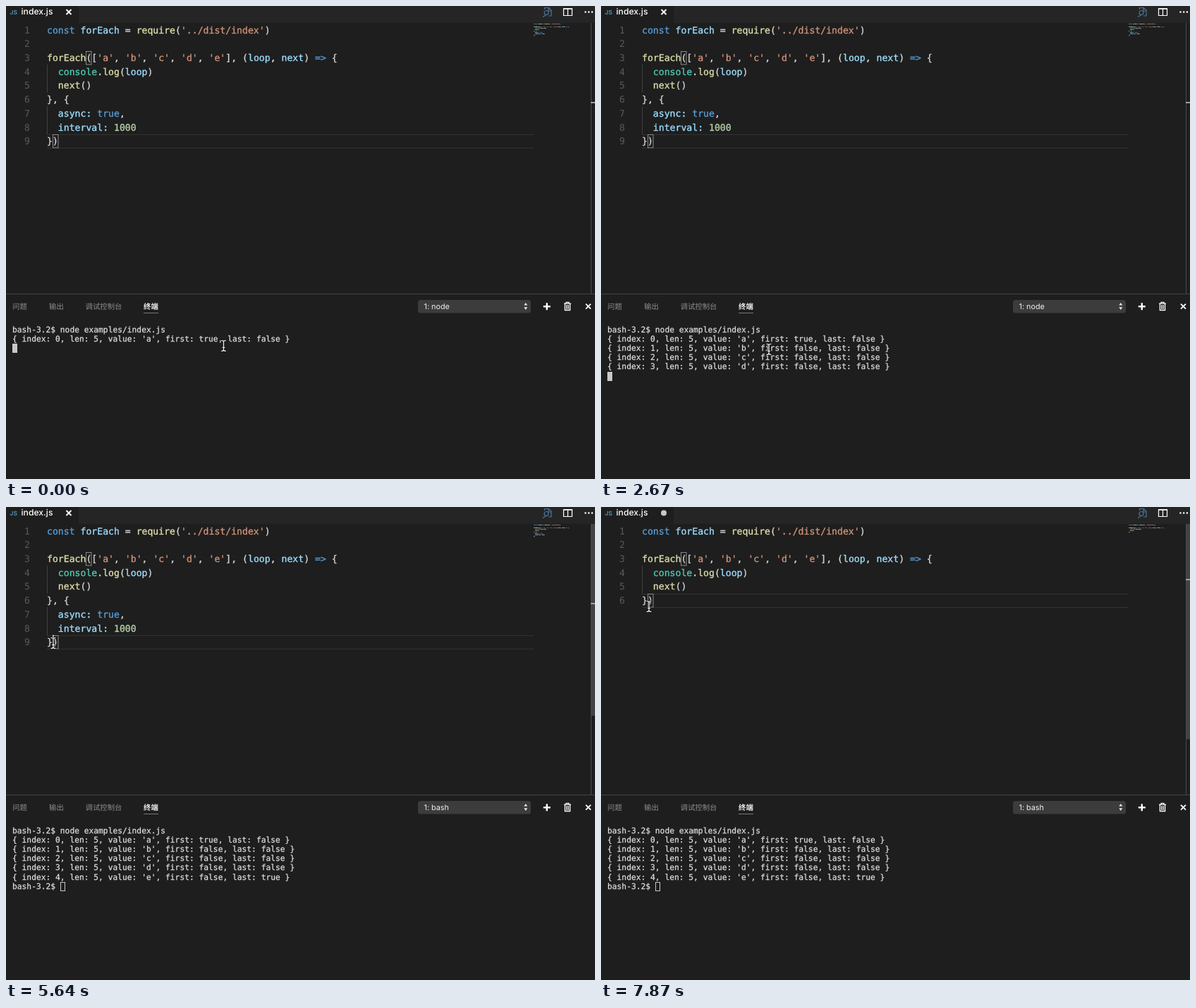
Animation of 835x671 px, one loop 8 s. Source, as an HTML page:

```html
<!DOCTYPE html>
<html lang="zh">
<head>
<meta charset="utf-8">
<style>
  html, body { margin: 0; width: 100%; height: 100%; overflow: hidden; background: #1e1e1e; }
  svg { display: block; }
  text { white-space: pre; text-rendering: geometricPrecision; }
  .code { font: 13.15px "DejaVu Sans Mono", monospace; fill: #d4d4d4; stroke-width: .35; }
  .code tspan { stroke: currentColor; fill: currentColor; }
  .num { fill: #5a5a5a; }
  .map { stroke-width: 1.6; }
  .term { font: 11.28px "DejaVu Sans Mono", monospace; fill: #dedede; stroke: #dedede; stroke-width: .25; }
  .ui { font-family: Inter, "Liberation Sans", sans-serif; fill: #fff; }
  .tab { font: 500 10.4px "Noto Sans CJK SC", "Noto Sans CJK", sans-serif; fill: #8e8e8e; }
  .line { fill: none; stroke: #fff; }
</style>
</head>
<body>
<svg width="835" height="671" viewBox="0 0 835 671">
  <rect width="835" height="671" fill="#1e1e1e"/>
  <rect x="103" width="732" height="24" fill="#252526"/>
  <text class="ui" x="5.5" y="11.5" font-size="8.5" font-weight="600" style="fill:#519aba">JS</text>
  <text class="ui" x="21.5" y="12.4" font-size="12.2" font-weight="500">index.js</text>
  <path id="close" class="line" stroke-width="1.9" d="M85.5 5l7 7m0-7l-7 7"/>
  <circle id="dirty" cx="89" cy="8.5" r="4" fill="#c8c8c8"/>
  <g class="line" stroke-width="1.2">
    <path d="M763.5 5V2.5h6l3.5 3.5v8h-4M769 3v4h4M766 12.5l-5 3" stroke="#4c7596"/>
    <circle cx="766" cy="9.5" r="3" stroke="#4c7596"/>
    <path d="M790.5 3.5h12v10h-12zM796.5 4v9.5M790 4.2h13"/>
  </g>
  <path d="M821.5 8.5h0m4.7 0h0m4.7 0h0" class="line" stroke-width="2.6" stroke-linecap="round"/>

  <g id="current" fill="none" stroke="#323232"><path d="M58 .5H748M58 19.5H748"/></g>
  <g id="selection" fill="#264f78"></g>
  <g id="long"></g>
  <g id="short"></g>
  <g id="brackets" fill="none" stroke="#8a8a8a">
    <rect x="113.5" y="64.5" width="7.5" height="18.5"/>
    <rect id="closing" x="66.5" y=".5" width="7.5" height="18.5"/>
  </g>
  <rect id="caret" x="66" width="1.8" height="19.5" fill="#c4c4c2"/>

  <rect id="slider" x="829" y="24" width="6" fill="#434343"/>
  <path d="M829.5 24V408" stroke="#4a4a4a"/>
  <rect id="mark" x="829" width="6" height="2" fill="#a0a0a0"/>

  <path d="M0 408.5H835" stroke="#454545"/>
  <g class="tab">
    <text x="9" y="429.8">问题</text>
    <text x="61" y="429.8">输出</text>
    <text x="112.5" y="429.8">调试控制台</text>
    <text x="195" y="429.8" font-weight="700" style="fill:#f0f0f0">终端</text>
  </g>
  <path d="M195 435.5h21" stroke="#777"/>
  <rect x="584" y="417" width="160" height="18.5" rx="3.5" fill="#3c3c3c"/>
  <text id="shell" class="ui" x="592.5" y="429.8" font-size="10.8" style="fill:#f0f0f0"></text>
  <path d="M734.3 424.5h5l-2.5-3.6zM734.3 427.3h5l-2.5 3.6z" fill="#e8e8e8"/>
  <path class="line" stroke-width="2.4" d="M761.8 426.2h10M766.8 421.2v10"/>
  <path class="line" stroke-width="1.3" d="M791 422.2h10M794 422v-1.6h4v1.6M792.4 422.5v9h7.2v-9M794.8 424v6M797.2 424v6"/>
  <path class="line" stroke-width="1.9" d="M822 422.7l7 7m0-7l-7 7"/>

  <g id="terminal" class="term"></g>
  <rect id="block"/>
  <g id="mouse">
    <g id="beam" fill="none" stroke-linecap="round">
      <path d="M-3-7.5Q0-7.5 0-5.5V5.5Q0 7.5-3 7.5M3-7.5Q0-7.5 0-5.5V5.5Q0 7.5 3 7.5M-1.5 2.5h3" stroke="#1a1a1a" stroke-width="2.6"/>
      <path d="M-3-7.5Q0-7.5 0-5.5V5.5Q0 7.5-3 7.5M3-7.5Q0-7.5 0-5.5V5.5Q0 7.5 3 7.5M-1.5 2.5h3" stroke="#f4f4f4" stroke-width="1.2"/>
    </g>
    <path id="arrow" d="M.5.8V13.5L3.3 10.8 5.5 15.6 7.6 14.7 5.5 10H9.3Z" fill="#111" stroke="#fff"/>
  </g>
</svg>
<script>
const $ = id => document.getElementById(id);
const LOOP = 8000, CH = 7.917, ROW = 19.72, TERM_CH = 6.8, TERM_ROW = 13.17, VIEW = 384;
const rowTop = row => 24 + row * ROW;

// Editor text and highlighting
const head = [
  "const forEach = require('../dist/index')", "",
  "forEach(['a', 'b', 'c', 'd', 'e'], (loop, next) => {",
  "  console.log(loop)", "  next()"];
const full = [...head, "}, {", "  async: true,", "  interval: 1000", "})"];
const brief = [...head, "})"];
const token = /('[^']*')|(const|true|=>)|(\d+)|(console)|(\w+(?=\())|(\w+:?)|[^]/g;
const colors = ["#ce9178", "#569cd6", "#b5cea8", "#4ec9b0", "#dcdcaa", "#9cdcfe"];
const paint = line => line.replace(token, (s, ...groups) => {
  const i = groups.slice(0, 6).findIndex(g => g !== undefined);
  return `<tspan color="${colors[i] || "#d4d4d4"}">${s.replace(">", "&gt;")}</tspan>`;
});

function editor(lines) {
  const code = lines.map((l, i) => `<text x="58" y="${38.6 + i * ROW}">${paint(l)}</text>`).join("");
  const nums = lines.map((l, i) => `<text class="num" x="34" y="${38.6 + i * ROW}" text-anchor="end">${i + 1}</text>`).join("");
  const guides = lines.map((l, i) => l[0] === " " ? `<path d="M58.5 ${rowTop(i)}v${ROW}" stroke="#404040" stroke-width="1"/>` : "").join("");
  return `<g class="code">${guides}${nums}${code}
    <g class="map" transform="translate(741 22.1) scale(.121 .1)">${code}</g></g>`;
}
$("long").innerHTML = editor(full);
$("short").innerHTML = editor(brief);

// Terminal output: [time shown, text]
const item = (i, v) => `{ index: ${i}, len: 5, value: '${v}', first: ${i === 0}, last: ${i === 4} }`;
const output = [
  [0, "bash-3.2$ node examples/index.js"],
  [0, item(0, "a")], [750, item(1, "b")], [1640, item(2, "c")],
  [2670, item(3, "d")], [3710, item(4, "e")], [3710, "bash-3.2$ "]];
$("terminal").innerHTML = output.map(([, s], i) =>
  `<text x="9" y="${Math.round(462.7 + i * TERM_ROW)}">${s}</text>`).join("");
const rows = [...$("terminal").children];

// Pointer: [time, x, y, is arrow]
const path = [
  [0, 308.5, 482], [1190, 296, 448], [1340, 271, 378], [1490, 252, 348], [1640, 246, 352],
  [1790, 243, 392], [1930, 240, 447], [2080, 238, 487], [3270, 262, 462], [3420, 295, 424, 1],
  [4160, 268, 392], [4310, 220, 320], [4450, 165, 250], [4600, 128, 208], [4750, 112.5, 192.5],
  [4900, 92, 196], [5200, 84, 195], [5350, 73, 194], [5500, 67, 193], [5790, 66, 185],
  [5940, 66, 166], [6080, 67, 143.5], [6230, 66, 136.5], [6370, 66, 137.5], [7870, 68, 141]];
const caretRow = [[0, 8], [5940, 7], [6080, 6], [6230, 5]];

const at = (steps, t) => steps.filter(s => s[0] <= t).pop();
const within = (t, a, b) => t >= a && t < b;
const show = (id, on) => $(id).style.display = on ? "" : "none";
const set = (id, attrs) => { for (const k in attrs) $(id).setAttribute(k, attrs[k]); };

function selectionBars(row) {
  let bars = "";
  for (let i = row; i <= 8; i++) {
    const from = i === row ? 1 : 0, to = i === 8 ? 1 : full[i].length + 1;
    bars += `<rect x="${58.3 + from * CH}" y="${rowTop(i) - .5}" width="${(to - from) * CH + (i < 8 ? .8 : 0)}" height="${ROW + .2}" rx="2.5"/>`;
  }
  return bars;
}

function draw(t) {
  const cut = t >= 7270, selecting = within(t, 5940, 7270), focused = t >= 5500;
  const row = at(caretRow, t)[1], top = rowTop(row) + .2;
  const total = VIEW + ((cut ? brief : full).length - 1) * ROW;

  show("long", !cut);
  show("short", cut);
  show("close", !cut);
  show("dirty", cut);
  show("current", !selecting);
  set("current", { transform: `translate(0 ${Math.round(top)})` });
  show("brackets", !within(t, 5940, 7420));
  set("closing", { y: Math.round(top) + .5 });
  $("selection").innerHTML = selecting ? selectionBars(row) : "";
  show("caret", within(t, 5500, 6670) || within(t, 7270, 7870));
  set("caret", { y: top - .5 });
  show("slider", within(t, 1490, 1930) || t >= 4310);
  set("slider", { height: VIEW * VIEW / total });
  set("mark", { y: Math.round(24 + row * ROW / total * VIEW) });

  const lines = output.filter(o => o[0] <= t).length;
  rows.forEach((r, i) => r.style.display = i < lines ? "" : "none");
  const done = lines === output.length;
  $("shell").textContent = done ? "1: bash" : "1: node";
  const x = done ? 9 + 10 * TERM_CH : 9;
  const y = Math.round(453 + (done ? lines - 1 : lines) * TERM_ROW);
  set("block", focused
    ? { x: x + .5, y: y + .5, width: 6, height: 12, fill: "none", stroke: "#c8c8c8" }
    : { x, y, width: 7, height: 13, fill: "#c8c8c8", stroke: "none" });

  const [, mx, my, arrow] = at(path, t);
  set("mouse", { transform: `translate(${mx} ${my})` });
  show("arrow", arrow);
  show("beam", !arrow);
}

const start = performance.now();
function frame() {
  draw((performance.now() - start) % LOOP);
  requestAnimationFrame(frame);
}
frame();
</script>
</body>
</html>
```
